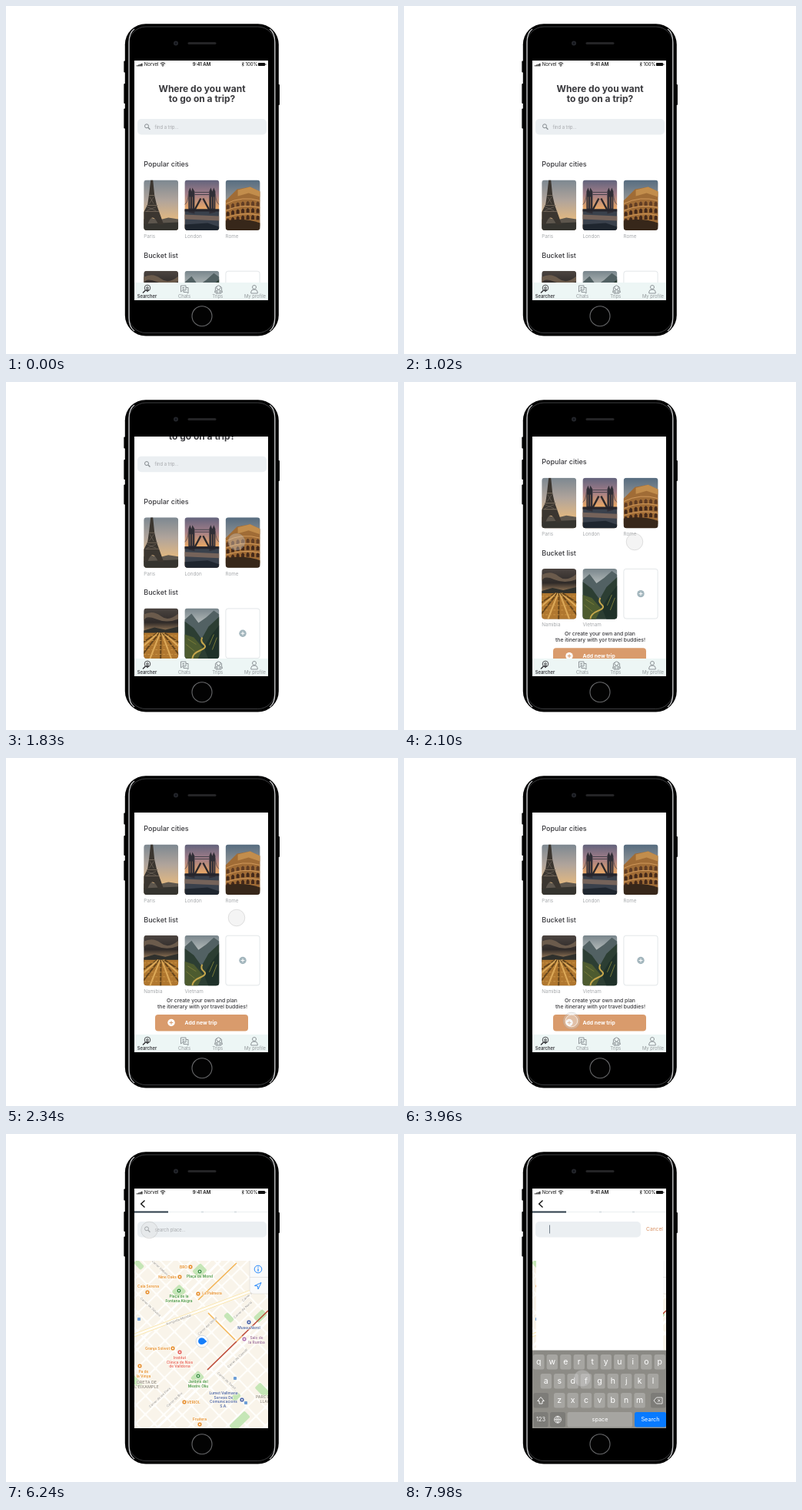
An HTML page for the animation above (8 s loop, 510 px wide and 453 px high).

```html
<!DOCTYPE html>
<html lang="en">
<head>
<meta charset="utf-8">
<title>Trip planner</title>
<style>
  html, body { margin: 0; width: 100%; height: 100%; overflow: hidden; background: #fff; }
  svg { display: block; width: 100vw; height: 100vh; }
  text { font-family: Inter, "Open Sans", sans-serif; }
</style>
</head>
<body>
<svg id="stage" viewBox="0 0 510 453"></svg>
<script>
const LOOP = 8000;
const INK = '#39393d', GREY = '#a5a8ab', SLATE = '#2c3c49', BLUE = '#157efb';
const times = (n, fn) => Array.from({ length: n }, (_, i) => fn(i)).join('');

const text = (x, y, s, size, fill = INK, weight = 400, anchor = 'start', extra = '') =>
  `<text x="${x}" y="${y}" font-size="${size}" fill="${fill}" font-weight="${weight}" text-anchor="${anchor}" ${extra}>${s}</text>`;
const rect = (x, y, w, h, fill, r = 0, extra = '') =>
  `<rect x="${x}" y="${y}" width="${w}" height="${h}" rx="${r}" fill="${fill}" ${extra}/>`;
const circle = (x, y, r, fill, extra = '') => `<circle cx="${x}" cy="${y}" r="${r}" fill="${fill}" ${extra}/>`;
const path = (d, fill, extra = '') => `<path d="${d}" fill="${fill}" ${extra}/>`;
const line = (d, stroke, w = 1, extra = '') =>
  `<path d="${d}" fill="none" stroke="${stroke}" stroke-width="${w}" ${extra}/>`;
const gradient = (id, ...stops) => `<linearGradient id="${id}" x2="0" y2="1">` +
  stops.map(([at, c]) => `<stop offset="${at}" stop-color="${c}"/>`).join('') + '</linearGradient>';

const defs = `<defs>
  <clipPath id="screen">${rect(167, 71, 174, 312, '#fff')}</clipPath>
  <clipPath id="mapArea">${rect(167, 165, 174, 218, '#fff')}</clipPath>
  <clipPath id="card">${rect(0, 0, 45, 65.5, '#fff', 4)}</clipPath>
  <pattern id="blocks" width="17" height="17" patternUnits="userSpaceOnUse" patternTransform="translate(255 270) rotate(-44)">
    ${rect(0, 0, 17, 17, '#fffefb')}${rect(1, 1, 15, 15, '#f9f4ea', 1.5)}
  </pattern>
  ${gradient('dusk', [0, '#7d8891'], [.4, '#b0a49b'], [.75, '#ddb683'])}
  ${gradient('sunset', [0, '#62637c'], [.28, '#a17d88'], [.55, '#e3a468'])}
  ${gradient('evening', [0, '#566c80'], [.5, '#a4a09a'])}
  ${gradient('storm', [0, '#4c4541'], [.28, '#2f2a28'], [.42, '#82694f'])}
  ${gradient('mist', [0, '#78858b'], [.4, '#c9cdca'])}
  ${gradient('keys', [0, '#8a8984'], [1, '#92908a'])}
</defs>`;

const photos = {
  Paris: rect(0, 0, 45, 66, 'url(#dusk)') +
    path('M0 51L8 49 20 52 32 49 45 51V66H0Z', '#5d564d') + path('M0 57L45 55V66H0Z', '#35342f') +
    path('M9 0H12L14 20 17 33 26 58H19Q11 40 5 58H0V42L5 32 7 18Z', '#3b3630') +
    line('M4 33H18M2 41H20M7 20H14', '#6f6356', 1.2) +
    line('M8 22L13 31M13 22L7 31M4 35L16 40M16 35L4 40', '#83766a', .5),
  London: rect(0, 0, 45, 66, 'url(#sunset)') +
    path('M0 38H45V66H0Z', '#3a414c') + path('M0 45L45 47V53L0 51Z', '#75635a') +
    path('M5 42V15L7 10 9 15 10 10 13 15V44ZM32 44V15L34 10 36 15 38 10 40 15V42Z', '#302e36') +
    line('M13 16H32M13 19H32', '#45414a', 1) + line('M13 39L21 24M32 39L24 24', '#2c282b', 2.4) +
    line('M0 32Q4 30 5 18M45 32Q41 30 40 18', '#54484d', .8) + rect(0, 38, 45, 3, '#25242b') +
    line('M7 22V37M10 22V37M35 22V37M38 22V37', '#a87a5f', .7) + path('M0 58L30 56 45 61V66H0Z', '#1f262f'),
  Rome: rect(0, 0, 45, 66, 'url(#evening)') +
    path('M0 27L7 20 15 12 32 9 45 15V60H0Z', '#a06c36') + path('M16 13L32 9 45 15V22L30 17 16 21Z', '#c28d4c') +
    times(3, row => times(7, i => path(
      `M${1 + i * 6.5} ${38 + row * 9 - (i - i * i / 9) * 2}v-4q2 -4 4 0v4z`, row ? '#44291a' : '#613d24'))) +
    line('M0 31Q22 20 45 27M0 40Q22 30 45 36M0 49Q22 41 45 46', '#d0985a', 1) +
    path('M0 53Q25 49 45 56V66H0Z', '#37271a'),
  Namibia: rect(0, 0, 45, 66, 'url(#storm)') +
    path('M0 8Q12 2 22 10T45 7V14Q30 20 16 14T0 17Z', '#6b5b4c') + path('M0 29L14 25 28 28 45 24V35H0Z', '#2f302c') +
    rect(0, 32, 45, 34, '#b0772f') +
    times(9, i => line(`M${18 + i * 1.1} 32L${-34 + i * 14} 66`, i % 2 ? '#deab5a' : '#66451b', 2)) +
    times(5, i => line(`M0 ${36 + i * 6}H45`, '#d09a49', .8, 'stroke-dasharray="3 2"')),
  Vietnam: rect(0, 0, 45, 66, 'url(#mist)') +
    path('M0 15L9 7 18 19 28 12 38 3 45 8V66H0Z', '#526163') + path('M0 17L12 26 22 40 31 24 45 11V66H0Z', '#2c3e33') +
    path('M0 34L12 38 24 52 17 66H0Z', '#4d5b2f') + path('M45 22L34 36 25 51 31 66H45Z', '#1f3129') +
    line('M23 38Q20 43 25 47T20 55 10 66', '#c5a64b', 2) +
    line('M4 40L15 47M2 47L13 56M38 34L32 48M42 38L36 54', '#777a3a', 1)
};
const photo = (name, x, y) =>
  `<g transform="translate(${x} ${y})" clip-path="url(#card)">${photos[name]}</g>` +
  text(x, y + 75.3, name, 6.3, GREY);

const plus = (x, y, fill, stroke) => circle(x, y, 4.7, fill) + line(`M${x - 2.4} ${y}h4.8M${x} ${y - 2.4}v4.8`, stroke, 1);
const lens = y => circle(183, y, 2.5, 'none', 'stroke="#858b90" stroke-width="1"') + line(`M185 ${y + 2}l2.4 2.4`, '#858b90', 1.3);

const statusBar = rect(167, 71, 174, 11, '#fff') +
  times(4, i => rect(170 + i * 2, 77.2 - i * .8, 1.4, 1.2 + i * .8, '#111')) +
  text(179.8, 78.3, 'Norvel', 6, '#111') +
  line('M200.8 75Q204 72.4 207.2 75M202.2 76.7Q204 75.2 205.8 76.7', '#111', 1) + circle(204, 78, .8, '#111') +
  text(254.5, 78.3, '9:41 AM', 6, '#111', 600, 'middle') +
  line('M306.8 74.5L309.4 77 308.1 78.3V73.2L309.4 74.5 306.8 77', '#111', .6) +
  text(311.6, 78.3, '100%', 6, '#111') + rect(328, 74, 9, 4, '#111', .7) + rect(337.5, 75, .8, 2, '#111');

const homePage = rect(167, 71, 174, 420, '#fff') + statusBar +
  text(255, 112, 'Where do you want', 12, INK, 700, 'middle') +
  text(255, 125.3, 'to go on a trip?', 12, INK, 700, 'middle') +
  rect(171, 147, 168, 20.5, '#ebeff2', 5) + lens(156.3) + text(193.5, 159.5, 'find a trip...', 5.8, GREY) +
  text(179.3, 209, 'Popular cities', 9, INK, 500) +
  ['Paris', 'London', 'Rome'].map((n, i) => photo(n, 179.2 + i * 53.2, 226.5)).join('') +
  text(179.3, 327.5, 'Bucket list', 9, INK, 500) +
  ['Namibia', 'Vietnam'].map((n, i) => photo(n, 179.2 + i * 53.2, 344.8)).join('') +
  rect(285.9, 345.2, 44.2, 64.7, '#fff', 3, 'stroke="#e2e6e8"') + plus(308, 377.5, '#a3b6bd', '#fff') +
  text(255, 431.8, 'Or create your own and plan', 6.8, INK, 500, 'middle') +
  text(255.5, 440.2, 'the itinerary with yor travel buddies!', 6.8, INK, 500, 'middle') +
  rect(194, 448, 121, 21.5, '#d99b6c', 4) + plus(215, 458.5, '#fff', '#d99b6c') +
  text(232.6, 461, 'Add new trip', 6.8, '#fff', 700);

const outline = (x, body, color = '#858b8f') =>
  `<g transform="translate(${x} 369)" fill="none" stroke="${color}" stroke-width=".9">${body}</g>`;
const navBar = rect(167, 360, 174, 23, '#edf6f5') +
  outline(184, '<circle cy="-2" r="3.8"/><circle cy="-2" r="1.3"/><path d="M-2.5 1L-6 4.5M-1.6 0L0 2.2 1.6 0" stroke-width="1.5"/>', INK) +
  outline(232, '<path d="M-4.5 -5H2V1H-2L-4.5 3Z"/><path d="M2 -2.5H5V5L3 3.5H-1V1"/><path d="M-2.7 -2.5H0M-2.7 -.7H0"/>') +
  outline(276.5, '<circle cy="-2.5" r="2.6"/><path d="M-3.5 5V2Q0 -1 3.5 2V5ZM-2.5 -4Q-5 -3 -4 0L-5 4M2.5 -4Q5 -3 4 0L5 4M-1.5 2V5M1.5 2V5"/>') +
  outline(323, '<circle cy="-3" r="2.5"/><path d="M-4.2 5V3Q-4 0 0 0T4.2 3V5Z"/>') +
  text(183.5, 380, 'Searcher', 5.8, INK, 600, 'middle') +
  ['Chats', 'Trips', 'My profile'].map((s, i) => text([232, 275.3, 324][i], 380, s, 5.9, '#92979a', 400, 'middle')).join('');

const label = (x, y, rows, color, size = 4.8) => rows.split('|').map((s, i) =>
  text(x, y + i * 5.7, s, size, color, 600, 'middle', 'stroke="#fffaf0" stroke-width="1.2" paint-order="stroke"')).join('');
const pin = (x, y, color) => circle(x, y, 3, color, 'stroke="#fff" stroke-width=".6"') + circle(x, y, 1, '#fff');
const street = (x, y, angle, s) =>
  text(x, y, s, 4.2, '#8f8b86', 400, 'middle', `transform="rotate(${angle} ${x} ${y})" stroke="#fffdf8" stroke-width="1" paint-order="stroke"`);
const park = (x, y, w, h) => rect(x - w / 2, y - h / 2, w, h, '#c5e6b6', 2, `transform="rotate(-44 ${x} ${y})"`);
const OR = '#e69132', GR = '#469848', RE = '#e6685f', VI = '#5069a8';

const map = '<g clip-path="url(#mapArea)">' + rect(167, 165, 175, 218, 'url(#blocks)') +
  park(225, 205, 14, 13) + park(252, 178, 15, 13) + park(249, 317, 14, 12) + park(334, 334, 10, 20) +
  park(173, 170, 7, 13) + park(290, 239, 7, 13) + park(304, 374, 28, 11) + park(299, 342, 12, 8) +
  park(169, 322, 8, 18) + park(331, 237, 16, 10) +
  line('M167 277L279 165M196 383L342 242', '#fff', 3) +
  line('M167 262L342 196', '#fffdf6', 5) + line('M167 260L342 194M167 264L342 198', '#f9e5b0', 1) +
  line('M250 216L300 168M263 233L298 268', '#f3b250', 1.4) + line('M262 307L300 270M307 263L341 230', '#bd4937', 1.6) +
  line('M300 270L307 263', '#ecaa62', 1.6) +
  street(225, 243, -20, 'Avinguda Meridal') + street(187, 226, 43, 'Carrer de Salvera') +
  street(321, 207, -43, 'Carrer de Tornell') + street(263, 251, -43, 'Carrer del Olmet') +
  street(302, 293, -43, 'Carrer de Casvell') + street(201, 344, -43, 'Carrer de les Flors') +
  street(220, 347, -43, 'Carrer de Bru') + street(309, 230, -43, 'Carrer de Noria') +
  street(286, 322, 43, 'Carrer de Sorell') + street(200, 176, 43, 'Carrer Valbona') +
  pin(240, 173, OR) + label(231, 175, 'BRO', OR) + pin(226, 186, OR) + label(210, 188, 'Nine Oaks', OR) +
  pin(252, 179, GR) + label(252, 187, 'Plaça de Morel', GR) + pin(184, 206, OR) + label(185, 200, 'Cala Serena', OR) +
  pin(225, 204, GR) + label(225, 213, 'Plaça de la|Fontana Alegra', GR) +
  pin(250, 208, OR) + label(268, 209, 'La Palmera', OR) + pin(316, 245, VI) + label(316, 254, 'Museu Nerol', VI) +
  pin(310, 267, '#b47bb1') + label(326, 267, 'Saló de|la Rumba', '#a077a3') +
  pin(217, 279, OR) + label(197, 281, 'Granja Solivet', OR) + pin(226, 284, RE) +
  label(226, 293, 'Institut|Clínica de Nois|de Valldoria', RE) + pin(250, 315, GR) + label(250, 324, 'Jardins del|Mestre Oliu', GR) +
  pin(174, 302, OR) + label(179, 311, 'Pa de|la Vinya', OR) +
  label(183, 325, 'DRETA DE|L’EIXAMPLE', '#9b978f', 5.4) + label(337, 344, 'PARC DEL|LLAC', '#9b978f', 5) +
  pin(307, 346, VI) + label(283, 339, 'Lumet Vallmaria|Serveis De|Comunicacions|S.A.', VI) +
  pin(232, 349, OR) + label(244, 351, 'VERIOL', OR) + pin(252, 378, OR) + label(252, 373, 'Fruitera', OR) +
  [[173, 241], [298, 318], [312, 350]].map(([x, y]) => rect(x - 2, y - 2, 4, 4, '#6d9ed7', .8)).join('') +
  circle(255, 270, 7.8, '#fff', 'stroke="#c9d2dc" stroke-width=".8"') +
  circle(254.5, 269.7, 4.4, BLUE) + path('M257 266L261.5 270 257 273.5Z', BLUE) +
  rect(317, 160, 28, 48, '#fafafa', 5, 'stroke="#dedbd5" stroke-width=".6"') + line('M317 186.5H342', '#dedede', .7) +
  circle(328, 176, 4.8, 'none', `stroke="${BLUE}" stroke-width=".9"`) + line('M328 175V179M328 172.8V174', BLUE, 1.1) +
  line('M323.5 197.5L332 193.5 328 202 327.5 198Z', BLUE, .9) + '</g>';

const searchPage = rect(167, 71, 174, 312, '#fff') + statusBar +
  line('M180.5 86.5L175.7 91L180.5 95.5', '#111', 1.4) +
  line('M211 101.5H341', '#eff2f4', 1.4) + line('M254 101.5h3M297 101.5h3', '#d3dade', 1.4) + line('M167 101.5H211', SLATE, 1.8) +
  '<rect id="field" x="171" y="114" height="20.5" rx="5" fill="#ebeff2"/>' +
  `<g id="hint">${lens(123.3)}${text(193.5, 126.6, 'search place...', 5.8, GREY)}</g>` +
  `<g id="editing">${text(315, 126.4, 'Cancel', 6.7, '#d99163')}${line('M189.5 118.5V129.5', '#65717d', .9, 'id="caret"')}</g>` +
  map + rect(172, 164, 165, 220, '#fff', 0, 'id="results"');

const KEY = '#a6a5a1', DARK_KEY = '#7d7c78';
const keyRow = (letters, first, pitch, y) => [...letters].map((c, i) => {
  const x = first + i * pitch;
  return rect(x - 7.2, y, 14.4, 19.5, KEY, 2.5) + text(x, y + 13.2, c, 10.5, '#fff', 400, 'middle');
}).join('');
const keyboard = rect(167, 281.5, 174, 102, 'url(#keys)') +
  keyRow('qwertyuiop', 175.3, 17.5, 287) + keyRow('asdfghjkl', 184.8, 17.4, 312) + keyRow('zxcvbnm', 202.2, 17.4, 337) +
  rect(168.5, 337, 19.5, 19.5, DARK_KEY, 2.5) + rect(321, 337, 19.5, 19.5, DARK_KEY, 2.5) +
  line('M178 342.5L173.7 347.5H176V351H180V347.5H182.3Z', '#fff', .9) +
  line('M328.5 343H336V351H328.5L325 347ZM330 345.3L333.5 348.7M333.5 345.3L330 348.7', '#fff', .8) +
  rect(168.5, 362, 19, 19.5, DARK_KEY, 2.5) + text(178, 374.3, '123', 7.3, '#fff', 400, 'middle') +
  rect(190, 362, 20, 19.5, DARK_KEY, 2.5) + circle(200, 371.7, 4.4, 'none', 'stroke="#fff" stroke-width=".8"') +
  line('M195.6 371.7H204.4M200 367.3V376.1M200 367.3Q195.5 371.7 200 376.1Q204.5 371.7 200 367.3', '#fff', .7) +
  rect(212.5, 362, 84.5, 19.5, KEY, 2.5) + text(255, 374.3, 'space', 7.3, '#fff', 400, 'middle') +
  rect(300, 362, 41, 19.5, '#087aff', 2.5) + text(320.5, 374.3, 'Search', 7.3, '#fff', 400, 'middle');

const sideButton = (x, y, h) => rect(x, y, 3, h, '#0a0a0a', 1);
const phone = sideButton(153.3, 71.5, 15) + sideButton(153.3, 101, 26) + sideButton(153.3, 133.5, 26) + sideButton(353, 102, 27) +
  rect(154.8, 23.2, 200, 406.3, '#000', 27) +
  rect(160, 27, 189.8, 398.5, '#000', 22, 'stroke="#4b4c4e" stroke-width=".8"') +
  line('M167 30Q160 35 160 47V406Q160 418 167 423M343 30Q349.8 35 349.8 47V406Q349.8 418 343 423', '#c6c7c9', 1.3) +
  rect(236.5, 47, 37, 3, '#242426', 1.5) + circle(221, 48.5, 3, '#24262b') + circle(221, 48.5, 1.2, '#11131a') +
  circle(255, 403.7, 13, '#030303', 'stroke="#68696b" stroke-width="1.1"');

document.getElementById('stage').innerHTML = defs + rect(0, 0, 510, 453, '#fff') + phone +
  `<g clip-path="url(#screen)"><g id="home"><g id="scroll">${homePage}</g>${navBar}</g>` +
  `<g id="search">${searchPage}</g><g id="keyboard">${keyboard}</g>` +
  `<g id="touch">${circle(0, 0, 10.8, '#ddd', 'fill-opacity=".33" stroke="#999" stroke-opacity=".34" stroke-width=".8"')}` +
  `${circle(0, 0, 7.8, '#fff', 'id="press" fill-opacity=".2" stroke="#fff" stroke-opacity=".7"')}</g></g>`;

// Each track row: time, value, easing of the way there.
const ease = {
  linear: p => p,
  out: p => 1 - (1 - p) ** 2,
  inOut: p => p * p * (3 - 2 * p)
};
const tracks = {
  scroll: [[1080, 0], [1500, 26, 'linear'], [1830, 50, 'linear'], [2310, 114, 'out']],
  touchX: [[2700, 300], [3500, 218, 'inOut'], [4900, 218], [5800, 186.5, 'inOut'], [6950, 186.5], [7800, 232, 'inOut']],
  touchY: [[2700, 208], [3500, 342, 'inOut'], [4900, 342], [5800, 125, 'inOut'], [6950, 125], [7800, 318, 'inOut']],
  touch: [[1300, 0], [1750, 1]],
  press: [[3800, 0], [3930, 1], [4150, 1], [4280, 0], [6330, 0], [6430, 1], [6530, 1], [6630, 0]],
  search: [[4200, 0], [4440, 1]],
  edit: [[6540, 0], [6800, 1, 'inOut']]
};
function at(name, t) {
  const rows = tracks[name], next = rows.findIndex(r => r[0] > t);
  if (next < 0) return rows[rows.length - 1][1];
  if (next === 0) return rows[0][1];
  const [t0, a] = rows[next - 1], [t1, b, curve = 'linear'] = rows[next];
  return a + (b - a) * ease[curve]((t - t0) / (t1 - t0));
}

const $ = id => document.getElementById(id);
const set = (id, name, value) => $(id).setAttribute(name, value);
function draw(t) {
  const edit = at('edit', t);
  set('scroll', 'transform', `translate(0 ${-at('scroll', t)})`);
  set('search', 'opacity', at('search', t));
  set('field', 'width', 168 - 31 * edit);
  set('hint', 'opacity', 1 - edit);
  set('editing', 'opacity', edit);
  set('caret', 'opacity', (t - 6700 + LOOP) % 1000 < 600 ? 1 : 0);
  set('results', 'opacity', edit);
  set('keyboard', 'transform', `translate(0 ${102 * (1 - edit)})`);
  set('touch', 'transform', `translate(${at('touchX', t)} ${at('touchY', t)})`);
  set('touch', 'opacity', at('touch', t));
  set('press', 'opacity', at('press', t));
}
const start = performance.now();
function tick() {
  draw((performance.now() - start) % LOOP);
  requestAnimationFrame(tick);
}
tick();
</script>
</body>
</html>
```
